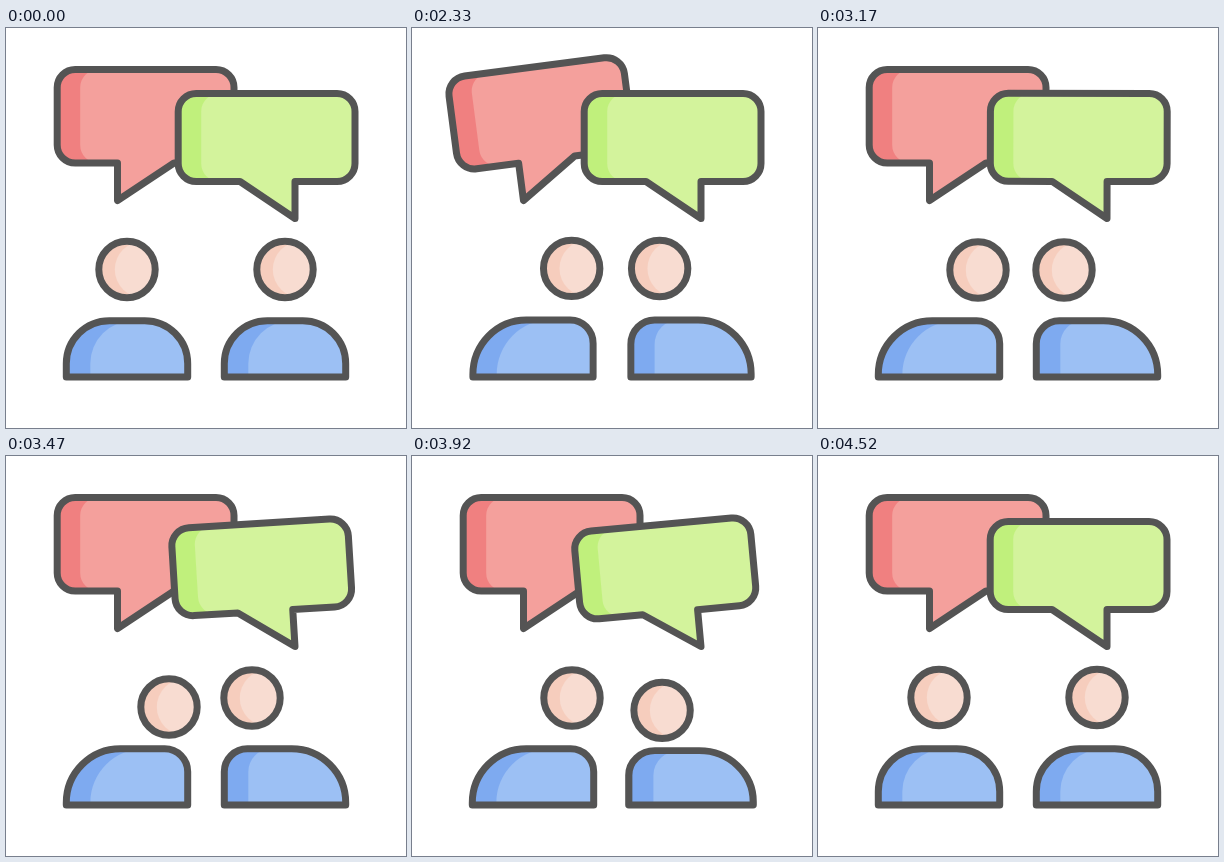
Animation of 400x400 px, one loop 4550 ms. Source, as an HTML page with a canvas:

```html
<!DOCTYPE html>
<html lang="en">
<head>
<meta charset="utf-8">
<title>Conversation</title>
<style>
html, body { margin: 0; width: 100%; height: 100%; overflow: hidden; background: #fff; }
canvas { display: block; width: 400px; height: 400px; }
</style>
</head>
<body>
<canvas id="stage"></canvas>
<script>
const LOOP = 4550, START = 2030, STEP = 30;
const INK = '#545454';
const RED = ['#f08080', '#f4a09c'];
const GREEN = ['#c0f07c', '#d3f39c'];
const BLUE = ['#7eaaf0', '#9cc0f4'];
const SKIN = ['#f6cdbd', '#f8dcd1'];

const canvas = document.getElementById('stage');
const ctx = canvas.getContext('2d');
const ratio = window.devicePixelRatio || 1;
canvas.width = canvas.height = 400 * ratio;

// Motion rules, all functions of time in ms
const mix = (a, b, p) => a + (b - a) * p;
const part = (t, start, length) => Math.min(1, Math.max(0, (t - start) / length));
const ease = (t, start, length) => (1 - Math.cos(Math.PI * part(t, start, length))) / 2;
const hump = (t, start, length) => (1 - Math.cos(2 * Math.PI * part(t, start, length))) / 2;

// A wobble around a tilted mean that fades in and out
function swing(t, { from, to, peak, period, mean, amp, decay }) {
  const wave = mean + amp * Math.cos(2 * Math.PI * (t - peak) / period);
  const window = ease(t, from, 180) * (1 - ease(t, to - 280, 280));
  return wave * Math.exp(-decay * (t - peak)) * window;
}

// Duck down, then rise slightly past the rest height
const duck = (t, start) => 15 * hump(t, start, 220) - 1.6 * hump(t, start + 190, 260);

const redSwing = { from: 1985, to: 3090, peak: 2180, period: 500, mean: -12.2, amp: -8.4, decay: 0.0017 };
const greenSwing = { from: 3090, to: 4200, peak: 3304, period: 410, mean: 5.1, amp: 10.4, decay: 0 };
const leftPerson = { x: 121, side: 1, reach: 39, go: 2000, back: 4060, nodAt: 3300 };
const rightPerson = { x: 279, side: -1, reach: 33, go: 2030, back: 3840, nodAt: LOOP };

function shifted(path, dx) {
  const copy = new Path2D();
  copy.addPath(path, new DOMMatrix([1, 0, 0, 1, dx, 0]));
  return copy;
}

function paint(path, lightPath, [dark, light]) {
  ctx.fillStyle = dark;
  ctx.fill(path);
  ctx.save();
  ctx.clip(path);
  ctx.fillStyle = light;
  ctx.fill(lightPath);
  ctx.restore();
  ctx.stroke(path);
}

// The tail hangs between x = a and x = b, with its tip at (tipX, tipY).
function bubblePath(left, right, top, bottom, a, b, tipX, tipY) {
  const r = 18;
  return new Path2D(
    `M${left + r} ${top}H${right - r}a${r} ${r} 0 0 1 ${r} ${r}V${bottom - r}a${r} ${r} 0 0 1 ${-r} ${r}` +
    `H${b}L${tipX} ${tipY}L${a} ${bottom}H${left + r}a${r} ${r} 0 0 1 ${-r} ${-r}V${top + r}a${r} ${r} 0 0 1 ${r} ${-r}Z`);
}

function bubble(left, right, top, bottom, a, b, tipX, tipY, colors) {
  const rest = [right, top, bottom, a, b, tipX, tipY];
  const outline = bubblePath(left, ...rest);
  const light = bubblePath(left + 23, ...rest);
  return angle => {
    ctx.save();
    ctx.translate(tipX, tipY);
    ctx.rotate(angle * Math.PI / 180);
    ctx.translate(-tipX, -tipY);
    paint(outline, light, colors);
    ctx.restore();
  };
}

const drawRed = bubble(51.2, 228, 41.5, 135, 111.5, 168, 111.5, 172.5, RED);
const drawGreen = bubble(172.2, 349, 65.4, 153.5, 234, 289, 289, 190.5, GREEN);

// side: 1 turns right, -1 turns left
function drawPerson(t, { x, side, reach, go, back, nodAt }) {
  const turn = ease(t, go, 350) - ease(t, back, 350);
  const dip = duck(t, go) + duck(t, back);
  const nod = hump(t, nodAt, 340);
  const squash = dip * (dip < 0 ? 0.006 : 0.002);

  const outer = mix(43, 54, turn), inner = mix(43, 23, turn);
  const [l, r] = side > 0 ? [outer, inner] : [inner, outer];
  const half = 60.7, tall = 56.3;
  const body = new Path2D(
    `M${-half} 0V${l - tall}a${l} ${l} 0 0 1 ${l} ${-l}H${half - r}a${r} ${r} 0 0 1 ${r} ${r}V0Z`);
  ctx.save();
  ctx.translate(x, 349);
  ctx.scale(1 + squash, 1 - 1.4 * squash);
  paint(body, shifted(body, 24), BLUE);
  ctx.restore();

  const head = new Path2D();
  head.arc(x + side * (reach * turn + 3 * nod), 241.5 + 0.5 * turn + dip + 9 * nod, 28.2, 0, 2 * Math.PI);
  paint(head, shifted(head, 16), SKIN);
}

function draw(time) {
  const t = time < START ? 0 : START + Math.floor((time - START) / STEP) * STEP;
  ctx.setTransform(ratio, 0, 0, ratio, 0, 0);
  ctx.fillStyle = '#fff';
  ctx.fillRect(0, 0, 400, 400);
  ctx.strokeStyle = INK;
  ctx.lineWidth = 7;
  ctx.lineJoin = 'round';
  drawRed(swing(t, redSwing));
  drawGreen(swing(t, greenSwing));
  drawPerson(t, leftPerson);
  drawPerson(t, rightPerson);
}

const begin = performance.now();
function tick() {
  draw((performance.now() - begin) % LOOP);
  requestAnimationFrame(tick);
}
tick();
</script>
</body>
</html>
```
